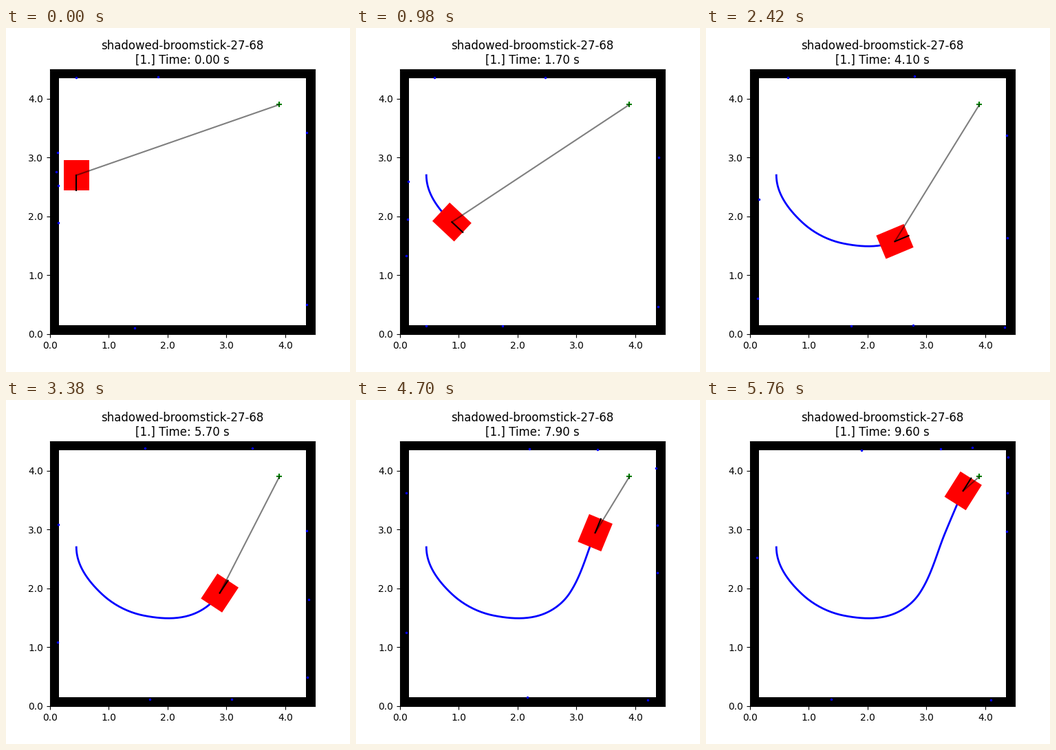
A matplotlib script for the animation above (5.86 s loop, 500 by 500 pixels).

```python
import numpy as np
import matplotlib.pyplot as plt
from matplotlib.animation import FuncAnimation
from matplotlib.patches import Polygon, Rectangle

# The plane is treated as complex numbers: x + iy
SIZE, WALL = 4.5, 0.15
GOAL = 3.9 + 3.9j
LENGTH, WIDTH = 0.508, 0.43
RAY_STEP = 6 / 119
BEAMS = np.radians(180 + 39.8 * np.arange(-4, 5))
STEPS = 97

# Key poses: time, x, y, heading in degrees
POSES = [
    (0.0, 0.450, 2.700, -90.0),
    (1.7, 0.884, 1.905, -43.2),
    (2.8, 1.597, 1.539, -11.1),
    (4.1, 2.463, 1.575, 22.7),
    (5.7, 2.886, 1.922, 56.6),
    (7.9, 3.318, 2.946, 67.6),
    (9.1, 3.527, 3.442, 67.0),
    (9.6, 3.623, 3.658, 57.7),
]


def hermite(u, knots, values, slopes):
    """Piecewise cubic through values with the given slopes."""
    i = np.clip(np.searchsorted(knots, u, side="right") - 1, 0, len(knots) - 2)
    h = knots[i + 1] - knots[i]
    t = (u - knots[i]) / h
    return ((1 + 2 * t) * (1 - t) ** 2 * values[i]
            + t * (1 - t) ** 2 * h * slopes[i]
            + t ** 2 * (3 - 2 * t) * values[i + 1]
            + t ** 2 * (t - 1) * h * slopes[i + 1])


def drive():
    """Position and heading at every 0.1 s."""
    times, x, y, angle = np.array(POSES).T
    angle = np.radians(angle)
    points = x + 1j * y
    bend = np.sinc(np.diff(angle) / (2 * np.pi))
    arc = np.append(0, np.cumsum(np.abs(np.diff(points)) / bend))
    speed = np.gradient(arc, times, edge_order=2)
    s = hermite(np.arange(STEPS) / 10, times, arc, speed)

    def at(u):
        return hermite(u, arc, points, np.exp(1j * angle))

    return at(s), np.angle(at(s + 1e-3) - at(s - 1e-3))


def scan(pos, heading):
    """March each beam until it lands inside a wall."""
    rays = np.exp(1j * (heading + BEAMS))
    reach = [np.where(d > 0, SIZE - WALL - p, WALL - p) / d
             for d, p in ((rays.real, pos.real), (rays.imag, pos.imag))]
    return pos + rays * np.ceil(np.min(reach, axis=0) / RAY_STEP) * RAY_STEP


def body(pos, heading):
    corner = (LENGTH + 1j * WIDTH) / 2
    corners = np.array([corner, corner.conjugate(), -corner, -corner.conjugate()])
    return pos + corners * np.exp(1j * heading)


def place(line, points):
    points = np.asarray(points)
    line.set_data(points.real, points.imag)


track, headings = drive()

fig, ax = plt.subplots(figsize=(5, 5), dpi=100)
ax.set(xlim=(0, SIZE), ylim=(0, SIZE), aspect="equal",
       xticks=range(5), yticks=range(5))
ax.xaxis.set_major_formatter("{x:.1f}")
ax.yaxis.set_major_formatter("{x:.1f}")

for edge in (0, SIZE - WALL):
    ax.add_patch(Rectangle((0, edge), SIZE, WALL, color="black", lw=0))
    ax.add_patch(Rectangle((edge, 0), WALL, SIZE, color="black", lw=0))

trail, = ax.plot([], [], color="blue", lw=2)
robot = ax.add_patch(Polygon(np.zeros((4, 2)), fc="red", ec="none", zorder=3))
ax.plot(GOAL.real, GOAL.imag, "+", color="green", ms=6, mew=1.5, zorder=3)
sight, = ax.plot([], [], color="black", alpha=0.5, lw=1.5, zorder=4)
nose, = ax.plot([], [], color="black", lw=1.5, zorder=5)
hits, = ax.plot([], [], ".", color="blue", ms=3, zorder=6)


def update(tick):
    # Poses are held for 20 ms and 100 ms in turn
    n = min(2 * (tick // 6) + (tick % 6 > 0), STEPS - 1)
    pos, heading = track[n], headings[n]
    outline = body(pos, heading)
    robot.set_xy(np.column_stack([outline.real, outline.imag]))
    place(trail, track[:n + 1])
    place(sight, [pos, GOAL])
    place(nose, [pos, pos + LENGTH / 2 * np.exp(1j * heading)])
    place(hits, scan(pos, heading))
    ax.set_title(f"shadowed-broomstick-27-68\n[1.] Time: {n / 10:.2f} s")


anim = FuncAnimation(fig, update, frames=293, interval=20, repeat=True,
                     repeat_delay=0, cache_frame_data=False)
plt.show()
```
